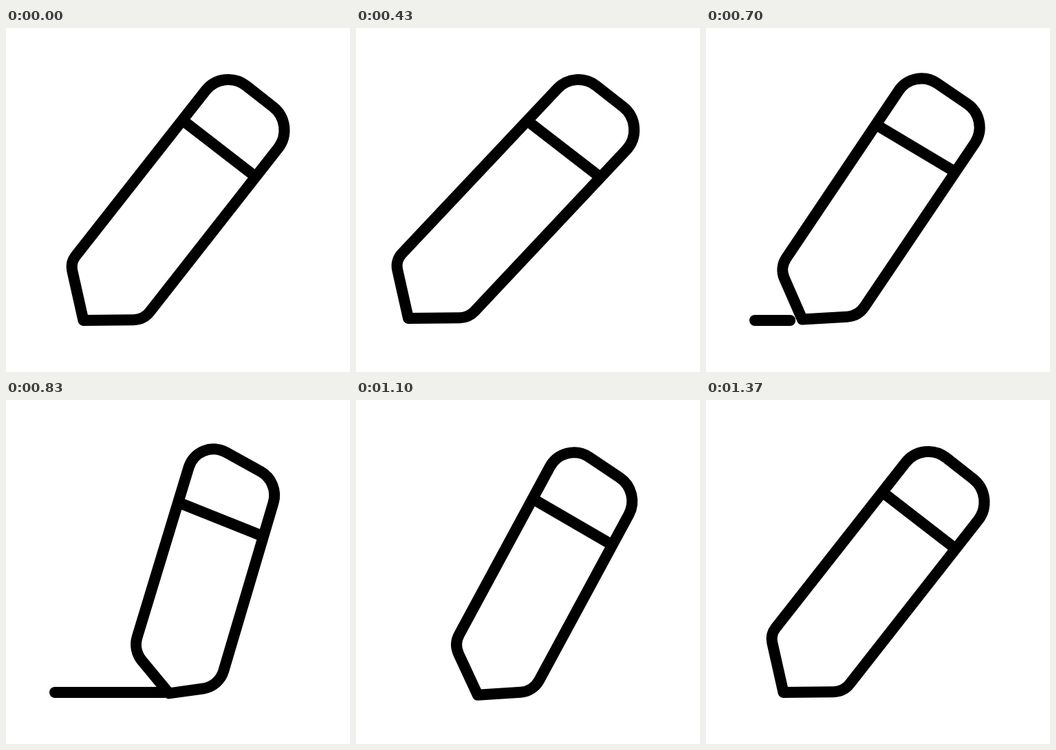
An HTML page with a canvas for the animation above (1.53 s loop, 500x500 px).

```html
<!DOCTYPE html>
<html>
<head>
<meta charset="utf-8">
<style>
  html, body { margin: 0; width: 100%; height: 100%; overflow: hidden; background: #fff; }
  canvas { display: block; }
</style>
</head>
<body>
<canvas id="stage" width="500" height="500"></canvas>
<script>
const ctx = document.getElementById('stage').getContext('2d');
const LOOP = 1530;
const START = 6, BACK_AT = 16, DRAWN_AT = 26, END = 41;  // in steps of 1/30 s
const INK = { left: 71, right: 257, y: 425, from: 19.1, erased: 33 };

const mix = (a, b, p) => a + (b - a) * p;
const mixAll = (a, b, p) => a.map((v, i) => Array.isArray(v) ? mixAll(v, b[i], p) : mix(v, b[i], p));
const progress = (step, from, to) => Math.min(1, Math.max(0, (step - from) / (to - from)));
const easeOut = u => u + u * u * (1 - u);
const easeIn = u => 1 - easeOut(1 - u);
const shift = ([x, y, r], dx, dy) => [x + dx, y + dy, r];

// Pencil corners [x, y, radius]: tip, left, top left, top right, right;
// then where the band meets the left and right edge
const rest = [[112.5, 425, 0], [93.6, 341, 26], [316, 58, 42], [421.9, 141, 43], [200, 424, 30], [.268, .266]];
const drawn = [[257.4, 427, 0], [201.3, 366.8, 39], [274.2, 52.6, 37], [394.1, 116.2, 39], [328.3, 415.7, 37], [.312, .266]];
// Pulled back: the lower end slides left while the top stays nearly still
const back = rest.map((part, i) =>
  i === 5 ? part : i === 2 || i === 3 ? shift(part, 3.5, 2.7) : shift(part, -43, -3.5));

function poseAt(step) {
  if (step < BACK_AT) return mixAll(rest, back, easeOut(progress(step, START, BACK_AT)));
  if (step < DRAWN_AT) return mixAll(back, drawn, easeIn(progress(step, BACK_AT, DRAWN_AT)));
  return mixAll(drawn, rest, easeOut(progress(step, DRAWN_AT, END)));
}

function line([x1, y1], [x2, y2], cap) {
  ctx.lineCap = cap;
  ctx.beginPath();
  ctx.moveTo(x1, y1);
  ctx.lineTo(x2, y2);
  ctx.stroke();
}

function drawPencil([tip, left, topLeft, topRight, right, band]) {
  const corners = [left, topLeft, topRight, right, tip];
  ctx.beginPath();
  ctx.moveTo(tip[0], tip[1]);
  for (let i = 0; i < 4; i++) {
    const [x, y, r] = corners[i], [nextX, nextY] = corners[i + 1];
    ctx.arcTo(x, y, nextX, nextY, r);
  }
  ctx.closePath();
  ctx.stroke();
  line(mixAll(topLeft, left, band[0]), mixAll(topRight, right, band[1]), 'butt');
}

function drawInk(step) {
  const tail = mix(INK.left, INK.right, progress(step, DRAWN_AT, INK.erased));
  const head = mix(INK.left, INK.right, progress(step, INK.from, DRAWN_AT));
  if (head > tail) line([tail, INK.y], [head, INK.y], 'round');
}

function render() {
  const step = Math.floor((performance.now() % LOOP) * .03 + .101);
  const swing = 4 * progress(step, DRAWN_AT, END) * (1 - progress(step, DRAWN_AT, END));
  ctx.clearRect(0, 0, 500, 500);
  ctx.lineWidth = 16;
  ctx.lineJoin = 'round';
  drawInk(step);
  ctx.save();
  ctx.translate(4 * swing, 3 * swing);  // the way home bows outwards
  drawPencil(poseAt(step));
  ctx.restore();
  requestAnimationFrame(render);
}
render();
</script>
</body>
</html>
```
